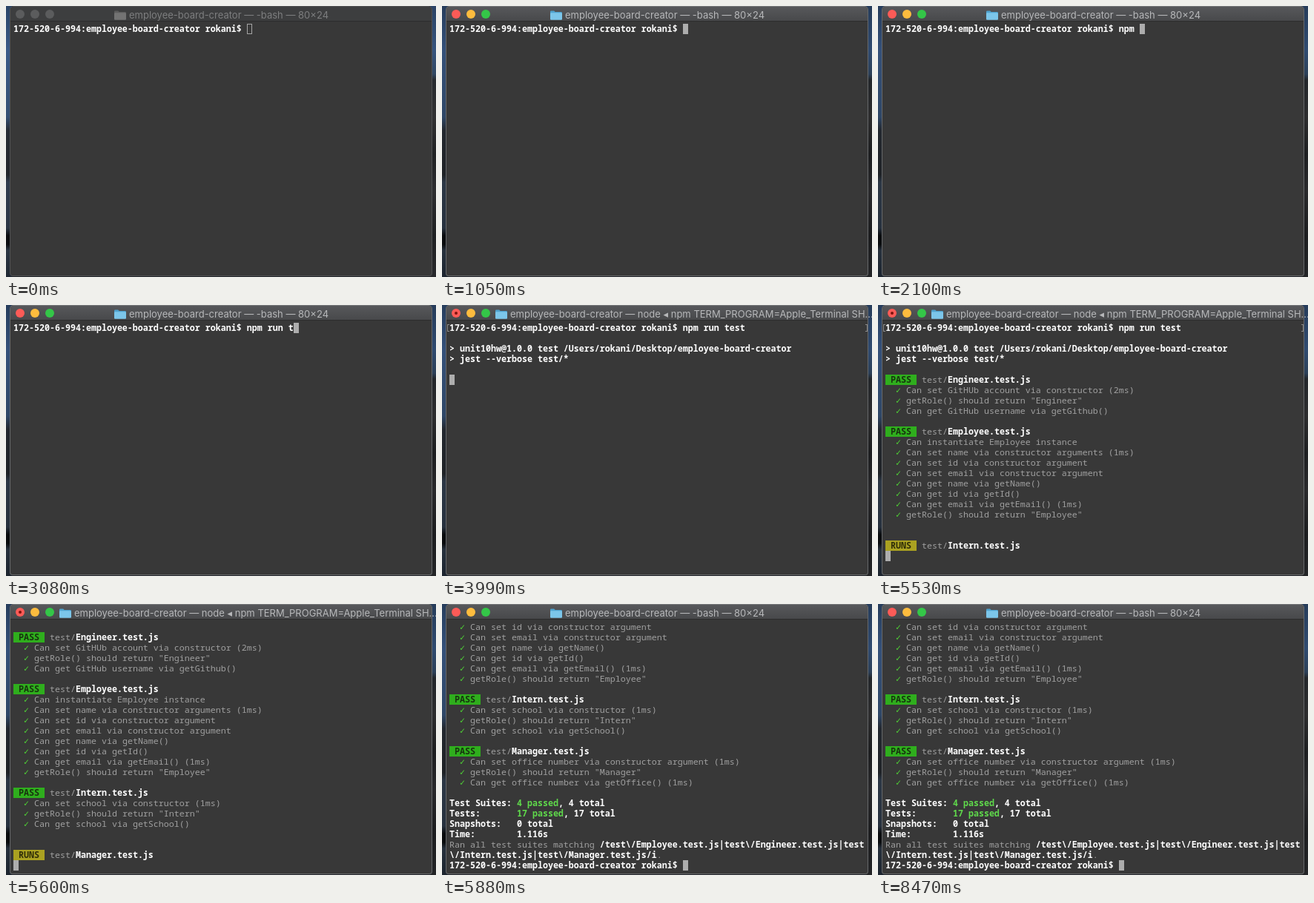
An HTML page for the animation above (8.61 s loop, 580x366 px).

```html
<!DOCTYPE html>
<html lang="en">
<head>
<meta charset="utf-8">
<title>Terminal test run</title>
<style>
  html, body { margin: 0; width: 100%; height: 100%; overflow: hidden; }
  body { position: relative; background: #23262b; }
  #desk, #desk i, #win, #bar, #light i, #rows, #cursor, .mark { position: absolute; box-sizing: border-box; }
  #desk { inset: 0; }
  #desk i { top: 0; bottom: 0; width: 8px; }
  #desk .l { left: 0; background: linear-gradient(#263d5c, #35517a 60px, #2f4767 150px, #23282f 168px, #1f2226 228px, #2c3745 238px, #27313e 300px, #0a0c0e 310px, #0a0c0e 322px, #27313d 330px, #1c242e); }
  #desk .r { right: 0; background: linear-gradient(#263c5a, #304b70 60px, #2c4058 92px, #23262a 100px, #2d2d2e 150px, #1d1e20 200px, #29292b 250px, #1c1d1f 310px, #242527); }
  #win { left: 5px; top: 0; width: 570px; height: 365px; background: #383838; border: 1px solid #66686a; border-top-color: #77797b; border-radius: 5px 5px 4px 4px; }
  #bar { left: 6px; top: 1px; width: 568px; height: 20px; border-radius: 4px 4px 0 0; background: linear-gradient(#57585b, #48494b); border-bottom: 1px solid #2c2c2d; }
  #title { position: absolute; left: 72px; right: 0; top: 2px; height: 20px; display: flex; align-items: center; color: #b7b8ba; font: 13px/20px Inter, Roboto, sans-serif; white-space: pre; }
  #title svg { width: 16px; height: 13px; margin-right: 4px; flex: none; }
  #light i { width: 12px; height: 12px; top: 5px; border-radius: 50%; }
  #rows { left: 10px; top: 24px; width: 570px; color: #fff; font: 600 calc(35px / 3)/14px "Noto Sans Mono", "DejaVu Sans Mono", monospace; white-space: pre; font-variant-ligatures: none; }
  #rows div { height: 14px; }
  #rows b { font-weight: 700; }
  #rows s { text-decoration: none; font-weight: 400; color: #a0a0a0; }
  #rows .ok { font-weight: 700; color: #5fd94b; }
  #rows u { font: 700 11.63px/0 "DejaVu Sans Mono", monospace; text-decoration: none; color: #4fd535; }
  .tag { display: inline-block; height: 14px; vertical-align: top; font-weight: 700; color: #17330f; background: #2fae1d; }
  .tag.runs { color: #302e08; background: #aaa121; }
  #cursor { width: 7px; height: 14px; background: #adadad; }
  .mark { top: 26px; width: 3px; height: 10px; border: 1px solid #8b8b8b; }
  .mark.l { left: 7px; border-right: 0; }
  .mark.r { left: 571px; border-left: 0; }
  .idle #win { border-color: #515253; }
  .idle #bar { background: #3d3e3f; }
  .idle #title { color: #7d7e7f; }
  .idle #title svg { filter: grayscale(1) brightness(.62); }
  .idle #light i { background: #5b5c5d !important; }
  .idle #cursor { background: none; border: 1px solid #a5a5a5; }
  .idle #desk { filter: brightness(1.12); }
</style>
</head>
<body>
<div id="desk"><i class="l"></i><i class="r"></i></div>
<div id="win"></div>
<div id="bar"></div>
<div id="light">
  <i style="left:13px;background:#fc5b57"></i>
  <i style="left:33px;background:#fdbc3e"></i>
  <i style="left:53px;background:#34c648"></i>
  <i id="busy" style="left:17px;top:9px;width:4px;height:4px;background:#7e120d"></i>
</div>
<div id="title">
  <svg viewBox="0 0 16 13"><path d="M0 2Q0 .6 1.3 .6H5.2L6.7 2.1H14.6Q16 2.1 16 3.4V5H0Z" fill="#4fa3cf"/><rect y="3.3" width="16" height="9.4" rx="1.2" fill="#7cc6ea"/></svg><span id="name"></span>
</div>
<div class="mark l"></div><div class="mark r"></div>
<div id="rows"></div>
<div id="cursor"></div>
<script>
const LOOP = 8610, ROWS = 24, CELL = 7, LINE = 14;
const $ = id => document.getElementById(id);
const dim = s => `<s>${s}</s>`;
const bold = s => `<b>${s}</b>`;
const ok = s => `<span class="ok">${s}</span>`;
const file = (tag, name) =>
  `<span class="tag ${tag.toLowerCase()}"> ${tag} </span> ${dim("test/")}${bold(name + ".test.js")}`;
const suite = (name, ...tests) =>
  [file("PASS", name), ...tests.map(t => `  <u>✓</u> ${dim(t)}`), ""];

const dir = "employee-board-creator";
const prompt = `172-520-6-994:${dir} rokani$ `;
const command = "npm run test";

const log = [
  "",
  `&gt; unit10hw@1.0.0 test /Users/rokani/Desktop/${dir}`,
  "&gt; jest --verbose test/*",
  "",
  ...suite("Engineer",
    "Can set GitHUb account via constructor (2ms)",
    'getRole() should return "Engineer"',
    "Can get GitHub username via getGithub()"),
  ...suite("Employee",
    "Can instantiate Employee instance",
    "Can set name via constructor arguments (1ms)",
    "Can set id via constructor argument",
    "Can set email via constructor argument",
    "Can get name via getName()",
    "Can get id via getId()",
    "Can get email via getEmail() (1ms)",
    'getRole() should return "Employee"'),
  ...suite("Intern",
    "Can set school via constructor (1ms)",
    'getRole() should return "Intern"',
    "Can get school via getSchool()"),
  ...suite("Manager",
    "Can set office number via constructor argument (1ms)",
    'getRole() should return "Manager"',
    "Can get office number via getOffice() (1ms)"),
  `${bold("Test Suites: ")}${ok("4 passed")}, 4 total`,
  `${bold("Tests:       ")}${ok("17 passed")}, 17 total`,
  `${bold("Snapshots:   ")}0 total`,
  `${bold("Time:        ")}1.116s`,
  `${dim("Ran all test suites matching ")}/test\\/Employee.test.js|test\\/Engineer.test.js|test`,
  `\\/Intern.test.js|test\\/Manager.test.js/i${dim(".")}`
];

const titles = {
  bash: `${dir} — -bash — 80×24`,
  npm: `${dir} — npm — 80×24`,
  node: `${dir} — node ◂ npm TERM_PROGRAM=Apple_Terminal SH…`
};
const runs = name => ["", file("RUNS", name)];

// Each step overrides part of the state reached before it.
const steps = [
  [0, { idle: true, title: "bash", typed: 0, lines: -1, status: [], done: false }],
  [700, { idle: false }],
  ...[1680, 1820, 1890, 2100, 2240, 2310, 2450, 2660, 3080, 3150, 3220, 3290]
    .map((t, i) => [t, { typed: i + 1 }]),
  [3500, { lines: 0 }],
  [3640, { title: "npm" }],
  [3850, { lines: 4 }],
  [3920, { title: "node" }],
  [4200, { status: ["Determining test suites to run..."] }],
  [4480, { status: runs("Engineer") }],
  [5250, { lines: 8, status: runs("Employee") }],
  [5250 + 140, { lines: 9 }],
  [5460, { lines: 18, status: runs("Intern") }],
  [5530, { lines: 19 }],
  [5600, { lines: 24, status: runs("Manager") }],
  [5740, { lines: log.length, status: [] }],
  [5880, { title: "bash", done: true }]
];
let state = {};
const scenes = steps.map(([t, change]) => [t, state = { ...state, ...change }]);

function draw({ idle, title, typed, lines, status, done }) {
  const started = lines >= 0;
  const text = [prompt + command.slice(0, typed)];
  if (started) text.push(...log.slice(0, lines), ...status, done ? prompt : "");
  const top = Math.max(0, text.length - ROWS);
  const col = started ? (done ? prompt.length : 0) : prompt.length + typed;

  document.body.className = idle ? "idle" : "";
  $("name").textContent = titles[title];
  $("title").style.left = title === "bash" ? "146px" : title === "npm" ? "149px" : "72px";
  $("busy").hidden = !started || done;
  $("busy").style.display = $("busy").hidden ? "none" : "";
  $("rows").innerHTML = text.slice(top).map(s => `<div>${s}</div>`).join("");
  $("cursor").style.left = 10 + col * CELL + "px";
  $("cursor").style.top = 24 + (text.length - 1 - top) * LINE + "px";
  for (const m of document.querySelectorAll(".mark"))
    m.style.display = started && !top ? "" : "none";
}

const start = performance.now();
let shown = -1;
function tick() {
  const t = (performance.now() - start) % LOOP;
  const now = scenes.findLastIndex(([at]) => at <= t);
  if (now !== shown) draw(scenes[shown = now][1]);
  requestAnimationFrame(tick);
}
tick();
</script>
</body>
</html>
```
